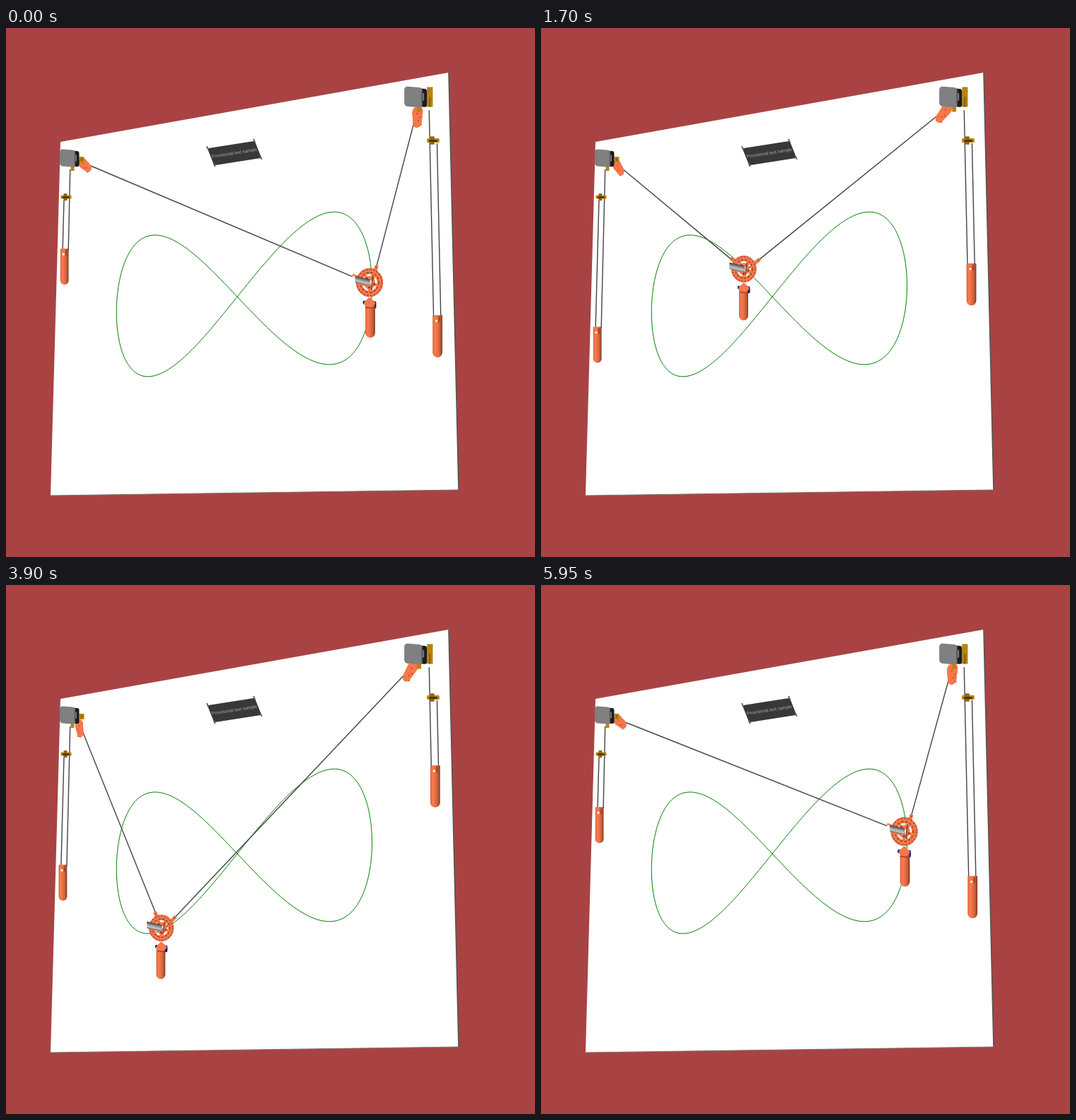
These frames come from a looping animation (748x748 px, 6000 ms). An HTML page with a canvas:

```html
<!DOCTYPE html>
<html lang="en">
<head>
<meta charset="utf-8">
<title>Hanging plotter</title>
<style>
html, body { margin: 0; width: 100%; height: 100%; overflow: hidden; background: #a94343; }
canvas { display: block; }
</style>
</head>
<body>
<canvas id="stage" width="748" height="748"></canvas>
<script>
const c = document.getElementById('stage').getContext('2d');
const LOOP = 6000, STEP = 50, ASPECT = 1.22, TAU = 2 * Math.PI;
const CORAL = '#f7784a', SHADE = '#9c4528', GOLD = '#b9820f', DARK = '#1c1c1c', CORD = '#444';

// Perspective of the board: unit square to stage
const depth = (u, v) => 1 - .15315 * u - .04481 * v;
function project(u, v) {
  const w = depth(u, v);
  return [(453.13 * u - 16.82 * v + 77) / w, (-107.65 * u + 470.38 * v + 161) / w];
}
const track = a => [.499 + .3225 * Math.cos(a), .5 + .1915 * Math.sin(2 * a)];

// Each side: cord pivot on stage (x, y) and on the board (u, v), motor, guide block, counterweight
const left = {
  x: 100, y: 186.5, u: .055, v: .0634, side: 1, size: 1, squeeze: .8,
  motor: { x: 87, y: 184, bracket: 8 }, block: { x: 85, y: 239, gap: 3 }, weight: { u: .021, v: .825 }
};
const right = {
  x: 584.5, y: 104.5, u: .93, v: .0686, side: -1, size: 1.17, squeeze: .94,
  motor: { x: 576, y: 97.5, bracket: 24 }, block: { x: 604, y: 159, gap: 5.5 }, weight: { u: .964, v: .8146 }
};
const SIDES = [left, right];

function at(x, y, scale, paint) {
  c.save();
  c.translate(x, y);
  c.scale(scale, scale);
  paint();
  c.restore();
}
function line(x1, y1, x2, y2, color = CORD, width = 1.4) {
  c.beginPath();
  c.moveTo(x1, y1);
  c.lineTo(x2, y2);
  c.strokeStyle = color;
  c.lineWidth = width;
  c.stroke();
}
function box(x, y, w, h, fill, r = 0) {
  c.beginPath();
  c.roundRect(x - w / 2, y - h / 2, w, h, r);
  c.fillStyle = fill;
  c.fill();
}
function dot(x, y, r, fill) {
  c.beginPath();
  c.arc(x, y, r, 0, TAU);
  c.fillStyle = fill;
  c.fill();
}
function ring(r, color, width, dash = []) {
  c.beginPath();
  c.ellipse(0, 0, r, r + 1, 0, 0, TAU);
  c.setLineDash(dash);
  c.strokeStyle = color;
  c.lineWidth = width;
  c.stroke();
  c.setLineDash([]);
}
function ramp(x1, y1, x2, y2, ...colors) {
  const g = c.createLinearGradient(x1, y1, x2, y2);
  colors.forEach((color, i) => g.addColorStop(i / (colors.length - 1), color));
  return g;
}
function capsule(x, y, half, length) {
  const fill = ramp(x - half, 0, x + half, 0, '#d8663d', '#fb7c4e', '#e86f44', '#c9603a', '#7d3a22');
  c.beginPath();
  c.roundRect(x - half, y, 2 * half, length, [1, 1, half, half]);
  c.fillStyle = fill;
  c.fill();
}

function board() {
  c.fillStyle = '#a94343';
  c.fillRect(0, 0, 748, 748);
  const [a, b, d, e] = [project(0, 0), project(1, 0), project(1, 1), project(0, 1)];
  c.beginPath();
  [a, b, d, e].forEach(p => c.lineTo(...p));
  c.fillStyle = '#fff';
  c.fill();
  line(...b, ...d, '#555', 1.6);
  line(...d, ...e, '#777', .8);

  c.beginPath();
  for (let i = 0; i <= 240; i++) c.lineTo(...project(...track(i / 240 * TAU)));
  c.strokeStyle = '#008000';
  c.lineWidth = 1;
  c.stroke();
}

function plate() {
  c.save();
  c.transform(1, -.155, .4, 1, 323, 177);
  box(0, 0, 67, 24, '#383838');
  for (const x of [-33, 33])
    for (const y of [-12, 12]) line(x, y - 3, x, y + 2, '#666', 2);
  c.font = '6.2px "Liberation Sans", sans-serif';
  c.textAlign = 'center';
  c.textBaseline = 'middle';
  c.fillStyle = '#aaa';
  c.fillText('Provisional text sample', 0, 0);
  c.restore();
}

// Tapered swing arm lying beside its cord, drawn in the plane of the board
function arm(s, tx, ty) {
  const shear = -.14, x = (tx - s.x) / s.squeeze, y = ty - s.y - shear * x;
  c.save();
  c.transform(s.squeeze, shear, 0, 1, s.x, s.y);
  c.rotate(Math.atan2(y, x));
  c.scale(s.size, s.size * s.side);
  for (let i = 0; i <= 1; i += .1) dot(12 + 13 * i, 1 + 3.5 * i, 7 - 1.5 * i, CORAL);
  for (let i = 0; i < 4; i++) dot(14 + 4 * i, 1 + 2 * i + 3 * (i % 2), .8, SHADE);
  c.restore();
}

function motor({ motor: m, size }) {
  at(m.x, m.y, size, () => {
    box(20, 3 - m.bracket / 8, 7, m.bracket, GOLD);
    line(20, 0, 20, m.bracket / 2, '#7c5508');
    box(7, 14, 5, 8, GOLD);
    c.transform(1, .08, 0, 1, 0, 0);
    box(10, 0, 13, 22, DARK, 3);
    box(12, -1, 2, 9, '#777');
    box(0, 0, 22, 24, '#7f8081', 4);
    line(10.5, -9, 10.5, 9, '#555');
  });
}

function guide({ block, size }) {
  at(block.x, block.y, size, () => {
    box(0, 0, 15, 5, GOLD, 1);
    box(-1, 0, 5, 10, '#94650b', 1);
    box(0, .5, 10, 2, '#3a2a08');
  });
}

function counterweight(s, u, v) {
  const { side, size, motor: m, block, weight } = s;
  const cord = Math.hypot(ASPECT * (u - s.u), v - s.v);
  const [x, y] = project(weight.u, weight.v - .495 * cord);
  line(block.x + 5.7 * side, m.y + 16 * size, x + 5.5 * side, y + 2);
  line(block.x - block.gap * side, block.y + 4, x - block.gap * .85 * side, y + 2);
  capsule(x, y, 5.9 * size, 51 * size);
  box(x + 2.5, y + 6, 2, 8, SHADE);
  dot(x - 1.5, y + 8, 1.6, '#fff');
}

function lug(x, y, s, k) {
  const a = Math.atan2(s.y - y, s.x - x), cos = Math.cos(a) * k, sin = Math.sin(a) * k;
  line(x + 14 * cos, y + 14 * sin, x + 22.5 * cos, y + 22.5 * sin, CORAL, 5);
  dot(x + 20 * cos, y + 20 * sin, 1, SHADE);
}

function gondola(x, y, k, lean) {
  at(x, y, k, () => {
    // hanging weight with its coupling
    box(5, 27, 6, 9, '#10108c', 2);
    box(-6, 24, 4, 4, '#10108c', 1);
    capsule(lean, 27, 5.9, 39.5);
    at(0, 25, 1, () => {
      c.rotate(TAU / 8);
      box(0, 0, 11, 11, CORAL, 2);
    });
    line(-5, 30, 5, 31, SHADE);

    // wheel
    ring(12.5, CORAL, 6.8);
    ring(14.8, SHADE, 1.2, [2, 2.2]);
    ring(11, SHADE, 1.5, [3, 2]);
    ring(16, '#cf633c', .8);
    ring(5, CORAL, 4);
    for (let i = 0; i < 5; i++) {
      const a = i / 5 * TAU - .9, cos = Math.cos(a), sin = Math.sin(a);
      line(3 * cos, 3 * sin, 11 * cos, 11 * sin, CORAL, 3.5);
      dot(6 * cos, 6 * sin, 1.1, '#5e2a18');
    }
    line(2, 9, 4, -9, SHADE);
  });

  // pen pointing at the viewer
  at(x, y, 1, () => {
    c.rotate(.22);
    dot(-22, 0, 4.5, '#fff');
    c.transform(1, 0, .25, 1, 0, 0);
    box(-10, 0, 22, 9, ramp(0, -4.5, 0, 4.5, '#444', '#777', '#aaa', '#c4c4c4', '#666'));
  });
}

function draw(time) {
  const t = Math.floor(time % LOOP / STEP) * STEP;
  const [u, v] = track(t / LOOP * TAU);
  const [px, py] = project(u, v), k = 1 / depth(u, v);
  const x = px - 3.5, y = py - 1.4;

  board();
  plate();
  for (const s of SIDES) {
    counterweight(s, u, v);
    guide(s);
  }
  line(left.x, left.y, px - 2, py + 1);
  line(right.x, right.y, px, py);
  arm(left, x, y);
  arm(right, px, py);
  SIDES.forEach(motor);
  lug(x, y, left, k);
  lug(px, py, right, k);
  gondola(x, y, k, (u - .55) * 3);
}

function tick() {
  draw(performance.now());
  requestAnimationFrame(tick);
}
tick();
</script>
</body>
</html>
```
